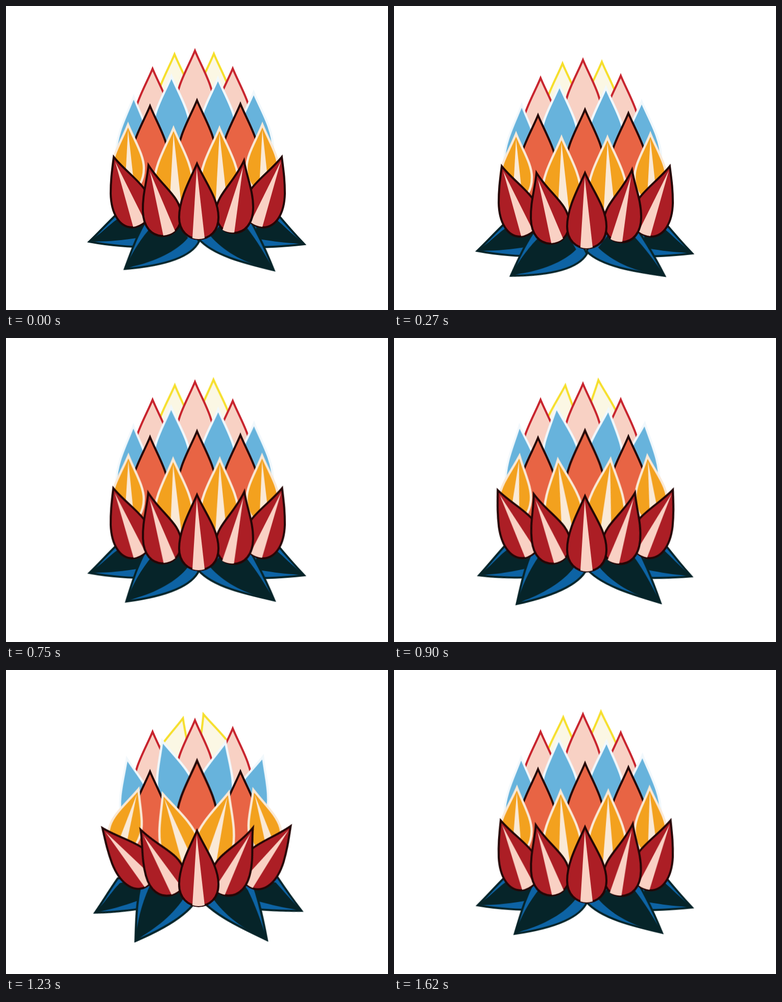
Animation of 748 by 596 pixels, one loop 1650 ms. Source, as an HTML page without scripts:

```html
<!DOCTYPE html>
<html lang="en">
<head>
<meta charset="utf-8">
<title>Blooming flower</title>
<style>
  html, body { margin: 0; width: 100%; height: 100%; overflow: hidden; background: #fff; }
  svg { display: block; width: 748px; height: 596px; }

  /* --start, --dip: vertical bob; --tilt, --sway: turn while bobbing;
     --x, --y, --turn, --grow: offset in full bloom */
  .part {
    transform-origin: 0 66px;
    animation: bloom 1650ms infinite;
  }
  @keyframes bloom {
    0% {
      transform: translate(0px, var(--start, 2px)) rotate(var(--tilt, 0deg)) scale(1);
      animation-timing-function: cubic-bezier(.333, 0, .667, 1);
    }
    20.9% {
      transform: translate(0px, var(--dip, 22.5px)) rotate(var(--sway, 0deg)) scale(1);
      animation-timing-function: cubic-bezier(.333, 0, .667, 1);
    }
    41.8% {
      transform: translate(0px, 0px) rotate(0deg) scale(1);
      animation-timing-function: cubic-bezier(.333, 0, .667, 1);
    }
    75.15% {
      transform: translate(var(--x, 0px), var(--y, 0px)) rotate(var(--turn, 0deg)) scale(var(--grow, 1));
      animation-timing-function: cubic-bezier(.333, 0, .667, .814);
    }
    100% {
      transform: translate(calc(var(--x, 0px) * .037), calc(var(--y, 0px) * .037))
        rotate(calc(var(--turn, 0deg) * .037)) scale(1);
    }
  }

  .leaves { fill: #0d63a4; stroke: #062429; stroke-width: 4; }
  .leaves .core { fill: #062429; stroke: none; }
  .yellow { fill: #fbf7e4; stroke: #f6df2b; stroke-width: 4; }
  .pink { fill: #f8d1c4; stroke: #c8242e; stroke-width: 4; }
  .blue { fill: #67b3dc; stroke: #f1f8fc; stroke-width: 4.5; }
  .coral { fill: #e86444; stroke: #240707; stroke-width: 4; }
  .gold { fill: #f3a11e; stroke: #fae9d6; stroke-width: 4.5; }
  .red { fill: #ac1e25; stroke: #240505; stroke-width: 4; }
  .ray { fill: #fae9d6; stroke: none; }
  .stripe { fill: #f9d1c4; stroke: none; }
</style>
</head>
<body>
<svg viewBox="0 0 748 596">
  <defs>
    <path id="petal" d="M0 0C13 32 38 72 38 110C38 145 20 165 0 165S-38 145-38 110C-38 72-13 32 0 0Z"/>
    <g id="tall">
      <use href="#petal"/>
      <path class="ray" d="M0 10L-8 155H16Z"/>
    </g>
    <g id="short">
      <path d="M0 0C13 32 31 60 31 85C31 110 20 130 0 130S-31 110-31 85C-31 60-13 32 0 0Z"/>
      <path class="ray" d="M0 10L-6 120H12Z"/>
    </g>
  </defs>

  <g class="leaves">
    <g class="part" style="transform-origin:234px 435px; --x:5px; --y:2px; --turn:-11.5deg">
      <path d="M163 460C180 444 197 425 220 403L280 405L290 470C250 472 200 467 163 460Z"/>
      <path class="core" d="M163 460C190 441 205 424 222 413L270 410L280 449C240 456 210 459 188 459.5Z"/>
    </g>
    <g class="part" style="transform-origin:514px 437px; --x:-2px; --turn:6deg">
      <path d="M584 465C566 446 550 428 530 404L480 405L470 470C510 472 545 469 584 465Z"/>
      <path class="core" d="M584 465C560 445 545 430 528 415H490V454C515 458 540 462 562 463Z"/>
    </g>
    <g class="part" style="transform-origin:294px 459px; --tilt:2.4deg; --sway:7.2deg; --x:3px; --y:-3px; --turn:-16deg; --grow:1.06">
      <path d="M235 516C300 508 362 492 378 456L340 400L286 398C262 430 248 475 235 516Z"/>
      <path class="core" d="M235 516C248 482 264 455 286 428L320 400L356 450C335 478 290 500 252 510Z"/>
    </g>
    <g class="part" style="transform-origin:452px 455px; --tilt:1.5deg; --sway:-4.6deg; --x:-3.5px; --y:-4.4px; --turn:13deg; --grow:1.06">
      <path d="M526 514C470 502 405 488 377 456L400 405L466 400C487 430 507 470 526 514Z"/>
      <path class="core" d="M526 514C508 483 492 458 471 432L440 405L400 450C425 478 465 500 505 508Z"/>
    </g>
  </g>

  <g class="yellow">
    <g transform="translate(330 92.5)"><use class="part" href="#petal" style="--turn:14.5deg"/></g>
    <g transform="translate(407 81.5)"><use class="part" href="#petal" style="--start:12px; --dip:30px; --y:2px; --turn:-18deg"/></g>
  </g>

  <g class="pink">
    <g transform="translate(287 121)"><use class="part" href="#petal"/></g>
    <g transform="translate(444 123.5)"><use class="part" href="#petal" style="--start:-1px; --dip:15px; --y:-9px"/></g>
    <g transform="translate(370 85.5)"><use class="part" href="#petal" style="--y:13px"/></g>
  </g>

  <g class="blue">
    <g transform="translate(250 172) scale(.9 1)"><use class="part" href="#petal" style="--start:6px; --dip:24px; --turn:-13deg"/></g>
    <g transform="translate(485 167.5)"><use class="part" href="#petal" style="--turn:16deg"/></g>
    <g transform="translate(324 135.5)"><use class="part" href="#petal" style="--y:1px; --turn:-16deg"/></g>
    <g transform="translate(415 140)"><use class="part" href="#petal" style="--turn:13deg"/></g>
  </g>

  <g class="coral">
    <g transform="translate(282 194)"><use class="part" href="#petal" style="--y:5px"/></g>
    <g transform="translate(459 190)"><use class="part" href="#petal" style="--y:9px"/></g>
    <g transform="translate(374 183)"><use class="part" href="#petal" style="--y:-2px; --grow:1.05"/></g>
  </g>

  <g class="gold">
    <g transform="translate(239 230.5)"><use class="part" href="#short" style="--turn:18deg"/></g>
    <g transform="translate(502 230.5)"><use class="part" href="#short" style="--y:2px; --turn:-15.5deg"/></g>
    <g transform="translate(328 237.5)"><use class="part" href="#tall" style="--y:2px; --turn:-18.5deg"/></g>
    <g transform="translate(418 237.5)"><use class="part" href="#tall" style="--turn:16deg"/></g>
  </g>

  <g class="red">
    <g class="part" style="transform-origin:245px 362px; --x:-1px; --turn:-20deg">
      <path d="M211 294C207 325 205 340 205 366C206 405 222 431 246 432C270 431 285 412 285 392C282 352 240 330 211 294Z"/>
      <path class="stripe" d="M214 304L249 431Q261 429 272 420Z"/>
    </g>
    <g class="part" style="transform-origin:506px 362px; --turn:16deg">
      <path d="M540 294C544 325 546 340 546 366C545 405 529 431 504 432C481 431 466 412 466 392C469 352 511 330 540 294Z"/>
      <path class="stripe" d="M538 303L502 431Q490 430 479 422Z"/>
    </g>
    <g class="part" style="transform-origin:305px 372px; --start:9px; --dip:26px; --y:2px; --turn:-13.5deg">
      <path d="M279 303C276 335 267 360 268 393C269 425 285 441 306 442C328 442 343 425 343 402C343 365 305 345 279 303Z"/>
      <path class="stripe" d="M282 316L308 441Q321 440 331 432Z"/>
    </g>
    <g class="part" style="transform-origin:447px 371px; --y:1px; --turn:15deg">
      <path d="M466 301C472 335 484 360 484 393C484 425 468 442 446 443C424 443 411 425 411 400C413 367 446 345 466 301Z"/>
      <path class="stripe" d="M464 314L447 442Q434 443 424 437Z"/>
    </g>
    <g class="part" style="--y:8px">
      <path d="M374 307C362 335 339 375 339 412C339 440 357 454 377 455C399 454 416 440 416 412C416 375 388 340 374 307Z"/>
      <path class="stripe" d="M373.500 316L365 453Q377 457 389 453Z"/>
    </g>
  </g>
</svg>
</body>
</html>
```
